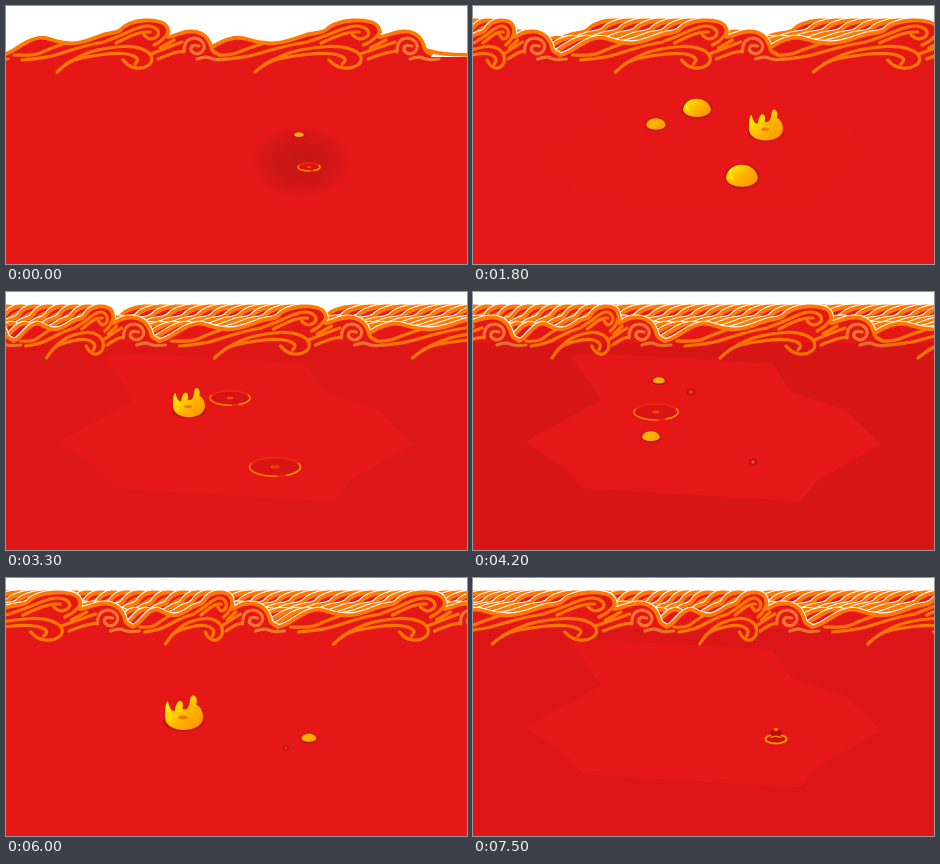
An HTML page with a canvas that plays this animation: 461x258 px, repeating every 7.8 s.

```html
<!DOCTYPE html>
<html lang="en">
<head>
<meta charset="utf-8">
<title>Red waves</title>
<style>
  html, body { margin: 0; width: 100%; height: 100%; overflow: hidden; background: #fff; }
  canvas { display: block; width: 461px; height: 258px; }
</style>
</head>
<body>
<canvas id="stage" width="461" height="258"></canvas>
<script>
const W = 461, H = 258, STEP = 300, STEPS = 26;
const RED = '#e61717', ORANGE = '#ff7900', CORAL = '#f57430';
const ctx = document.getElementById('stage').getContext('2d');
ctx.lineCap = ctx.lineJoin = 'round';

// Linear interpolation through [step, value] pairs
function track(keys, k) {
  let i = 0;
  while (i < keys.length - 2 && k >= keys[i + 1][0]) i++;
  const [a, u] = keys[i], [b, v] = keys[i + 1];
  return u + (v - u) * Math.min(1, Math.max(0, (k - a) / (b - a)));
}

// ---- Waves: x is relative to the centre of the small curl ----
const SCROLL = [[0, 0], [4, 64], [8, 119], [14, 196], [18, 255], [22, 298], [26, 359]];
const UNITS = [[403, 1.12], [190, 1], [-28, .6], [-173, 1.1], [-388, 1]];
const TOP = [-206, 52, -190, 49, -176, 40, -164, 33, -152, 31, -138, 36, -122, 38,
  -106, 34, -92, 28, -77, 26, -72, 20, -60, 15, -44, 14, -31, 17, -27, 25, -30, 32,
  -20, 29, -12, 26, 0, 25, 10, 30, 15, 39, 16, 45, 22, 48];
const LEAF = [
  [-182, 49, -162, 50, -147, 43, -133, 38],
  [-174, 54, -150, 52, -128, 45, -108, 39, -92, 36]
];
const SWELL = [
  [-130, 58, -112, 47, -85, 41, -62, 40, -46, 46, -43, 56, -53, 63, -66, 61, -73, 54],
  [-139, 66, -128, 55, -105, 50, -82, 47, -66, 48, -57, 53, -61, 58]
];
const CREST = [
  [-90, 35, -76, 30, -62, 23, -48, 19, -38, 23, -37, 30, -46, 34, -52, 29],
  [-80, 37, -66, 30, -54, 26, -46, 26],
  [-27, 26, -33, 34, -42, 39],
  [-45, 48, -30, 42, -14, 36],
  [-38, 53, -24, 47, -12, 45],
  [-36, 42, -22, 34]
];
const CURL = [
  [-12, 46, -12, 36, -2, 31, 7, 35, 9, 43, 2, 49, -6, 45, -4, 39, 3, 40],
  [1, 53, 10, 50, 18, 54, 30, 53]
];

function trace(pts, x0, k) {
  const p = [];
  for (let i = 0; i < pts.length; i += 2) {
    const x = pts[i];
    p.push([x0 + (x > -14 ? x : -14 + (x + 14) * k), pts[i + 1]]);
  }
  const n = p.length - 1;
  ctx.beginPath();
  ctx.moveTo(...p[0]);
  for (let i = 1; i < n; i++) {
    const [x, y] = p[i], [u, v] = p[i + 1];
    ctx.quadraticCurveTo(x, y, (x + u) / 2, (y + v) / 2);
  }
  ctx.lineTo(...p[n]);
  return p;
}

function stroke(color, width) {
  ctx.strokeStyle = color;
  ctx.lineWidth = width;
  ctx.stroke();
}

function drawUnit(x, k) {
  const p = trace(TOP, x, k);
  ctx.lineTo(p[p.length - 1][0], 68);
  ctx.lineTo(p[0][0], 68);
  ctx.fillStyle = RED;
  ctx.fill();
  trace(TOP, x, k);
  stroke(ORANGE, 3.8);
  for (const line of [...LEAF, ...SWELL, ...CREST]) {
    trace(line, x, k);
    stroke(ORANGE, 3.2);
  }
  for (const line of CURL) {
    trace(line, x, k);
    stroke(CORAL, 3.2);
  }
}

function drawWaves(step) {
  const dx = track(SCROLL, step);
  const units = UNITS.map(([x, k]) => [x + dx, k]).filter(([x]) => x > -40 && x < W + 240);
  for (const [x, k] of units) {
    trace(TOP, x, k);
    stroke('#fff', 6);
  }
  ctx.fillStyle = RED;
  ctx.fillRect(0, 51, W, 18);
  const tail = UNITS[0][0] + dx;
  if (tail < W) {
    trace([14, 43, 28, 48, 62, 49], tail, 1);
    stroke(ORANGE, 3.6);
  }
  for (const [x, k] of units) drawUnit(x, k);
}

// ---- Shading of the red surface ----
const VIGNETTE = [[0, 0], [5, 0], [8, .03], [12, .04], [14, .07], [16, 0], [22, 0], [25, .045], [26, .045]];
const GLOW = [130, 62, 300, 72, 318, 100, 372, 118, 408, 152, 345, 188, 328, 209,
  240, 204, 110, 196, 92, 176, 52, 150, 128, 108, 98, 64];

function drawShade(step) {
  const a = track(VIGNETTE, step);
  if (a) {
    ctx.beginPath();
    ctx.rect(0, 51, W, H - 51);
    for (let i = 0; i < GLOW.length; i += 2) ctx[i ? 'lineTo' : 'moveTo'](GLOW[i], GLOW[i + 1]);
    ctx.closePath();
    ctx.fillStyle = `rgba(20,10,10,${a})`;
    ctx.fill('evenodd');
  }
  const b = track([[0, .16], [4, .04], [6, 0]], step);
  if (b) {
    ctx.save();
    ctx.translate(295, 156);
    ctx.scale(1, .72);
    const g = ctx.createRadialGradient(0, 0, 8, 0, 0, 52);
    g.addColorStop(0, `rgba(30,15,15,${b})`);
    g.addColorStop(.6, `rgba(30,15,15,${b * .6})`);
    g.addColorStop(1, 'rgba(30,15,15,0)');
    ctx.fillStyle = g;
    ctx.fillRect(-55, -55, 110, 110);
    ctx.restore();
  }
}

// ---- Golden drops: [x, y, [step, look, width], ...] ----
const DROPS = [
  [293, 130, [0, 'dome', 10], [4, 'dome', 30], [6, 'crown', 34], [7, 'ring', 44], [8, 'ring', 54], [10, '', 60]],
  [303, 162, [0, 'ring', 22], [2, '', 26]],
  [303, 162, [17, 'dome', 9], [18, 'dome', 12], [22, 'dome', 18], [24, 'splash', 20], [26, '', 22]],
  [269, 176, [3, 'dome', 10], [4, 'dome', 16], [6, 'dome', 32], [7, 'crown', 40], [8, 'crown', 42], [10, 'ring', 48], [12, '', 54]],
  [280, 170, [13, 'dot', 9], [18, 'dot', 8], [21, '', 5]],
  [183, 121, [4, 'dome', 12], [8, 'dome', 27], [11, 'crown', 32], [13, 'ring', 40], [14, 'ring', 44], [16, '', 52]],
  [224, 107, [3, 'dot', 12], [5, 'dome', 20], [8, 'dome', 44], [9, 'crown', 44], [11, 'ring', 40], [13, '', 46]],
  [218, 100, [13, 'dot', 10], [15, '', 8]],
  [178, 147, [13, 'dome', 13], [14, 'dome', 18], [18, 'dome', 33], [20, 'crown', 38], [21, 'ring', 45], [22, 'ring', 50], [24, '', 58]],
  [186, 90, [13, 'dome', 9], [14, 'dome', 12], [16, 'dome', 18], [17, 'crown', 20], [18, 'ring', 22], [20, '', 28]]
];

function ellipse(x, y, w, h, from = 0, to = Math.PI * 2) {
  ctx.beginPath();
  ctx.ellipse(x, y, w / 2, h / 2, 0, from, to);
}

function gold(w) {
  const g = ctx.createLinearGradient(-w * .4, -w * .5, w * .35, w * .3);
  g.addColorStop(0, w > 20 ? '#ffee00' : '#ffb000');
  g.addColorStop(.45, '#ffb400');
  g.addColorStop(1, '#ff8a00');
  return g;
}

const LOOKS = {
  dome(w) {
    const h = w * Math.min(.77, .4 + .01 * w), y = -.28 * h;
    ellipse(0, y + 1, w + 3, h + 2);
    ctx.fillStyle = '#c41414';
    ctx.fill();
    ctx.beginPath();
    ctx.moveTo(-w / 2, y + h * .1);
    ctx.bezierCurveTo(-w * .46, y - h * .62, w * .4, y - h * .7, w / 2, y + h * .1);
    ctx.bezierCurveTo(w * .46, y + h * .62, -w * .46, y + h * .62, -w / 2, y + h * .1);
    ctx.fillStyle = gold(w);
    ctx.fill();
    if (w > 38) {
      ellipse(w * .38, y + h * .2, w * .32, h * .32);
      ctx.fillStyle = '#ff9800';
      ctx.fill();
    }
    if (w > 25) {
      ellipse(-w * .12, y - h * .08, w * .5, h * .62, 2.4, 4.7);
      stroke('#fff200', w * .05);
    }
  },
  crown(w) {
    ellipse(0, -w * .08, w * 1.08, w * .5);
    ctx.fillStyle = '#c81414';
    ctx.fill();
    ctx.save();
    ctx.scale(w, w);
    ctx.beginPath();
    ctx.moveTo(-.5, -.2);
    ctx.quadraticCurveTo(-.5, -.64, -.42, -.62);
    ctx.quadraticCurveTo(-.37, -.36, -.25, -.36);
    ctx.quadraticCurveTo(-.2, -.64, -.1, -.64);
    ctx.quadraticCurveTo(0, -.62, -.04, -.42);
    ctx.quadraticCurveTo(.1, -.36, .15, -.58);
    ctx.quadraticCurveTo(.16, -.8, .26, -.78);
    ctx.quadraticCurveTo(.38, -.7, .32, -.54);
    ctx.quadraticCurveTo(.5, -.45, .5, -.2);
    ctx.bezierCurveTo(.48, .24, -.48, .24, -.5, -.2);
    ctx.restore();
    ctx.fillStyle = gold(w);
    ctx.fill();
    ellipse(-w * .03, -w * .2, w * .24, w * .1);
    ctx.fillStyle = '#f47800';
    ctx.fill();
  },
  ring(w) {
    const h = w * .36;
    ellipse(0, -1, w, h);
    ctx.fillStyle = '#d91414';
    ctx.fill();
    stroke('#f82810', 1.4);
    ellipse(0, -1, w, h, -.4, 1.1);
    stroke('#ff9800', 1.6);
    ellipse(0, -1, w, h, 1.5, 3.5);
    stroke('#ff8000', 1.5);
    ellipse(0, -1, w * .16, h * .12);
    stroke('#ff5a08', 1);
  },
  splash(w) {
    ellipse(0, -1, w, w * .42);
    ctx.fillStyle = '#c81212';
    ctx.fill();
    stroke('#ff9000', 2);
    ellipse(0, -w * .32, w * .6, w * .34);
    ctx.fillStyle = '#b81010';
    ctx.fill();
    ellipse(0, -w * .5, w * .2, w * .14);
    ctx.fillStyle = '#ff9000';
    ctx.fill();
    ellipse(0, -w * .1, w * .5, w * .14, 3.4, 6);
    stroke('#ff8000', 1.4);
  },
  dot(w) {
    ellipse(0, 0, w, w * .8);
    ctx.fillStyle = '#c41212';
    ctx.fill();
    ellipse(0, 0, w * .4, w * .34);
    ctx.fillStyle = '#ff5a10';
    ctx.fill();
  }
};

function drawDrops(step) {
  for (const [x, y, ...keys] of DROPS) {
    if (step < keys[0][0] || step >= keys[keys.length - 1][0]) continue;
    const look = keys.filter(([k]) => k <= step).pop()[1];
    ctx.save();
    ctx.translate(x, y);
    LOOKS[look](track(keys.map(([k, , w]) => [k, w]), step));
    ctx.restore();
  }
}

// Earlier crests stay visible above the current wave until the loop restarts
function render(step) {
  ctx.fillStyle = '#fff';
  ctx.fillRect(0, 0, W, H);
  ctx.fillStyle = RED;
  ctx.fillRect(0, 51, W, H - 51);
  for (let k = 0; k <= step; k++) drawWaves(k);
  drawShade(step);
  drawDrops(step);
}

let shown = -1;
const start = performance.now();
function tick() {
  const step = Math.floor((performance.now() - start) / STEP) % STEPS;
  if (step !== shown) render(shown = step);
  requestAnimationFrame(tick);
}
tick();
</script>
</body>
</html>
```
